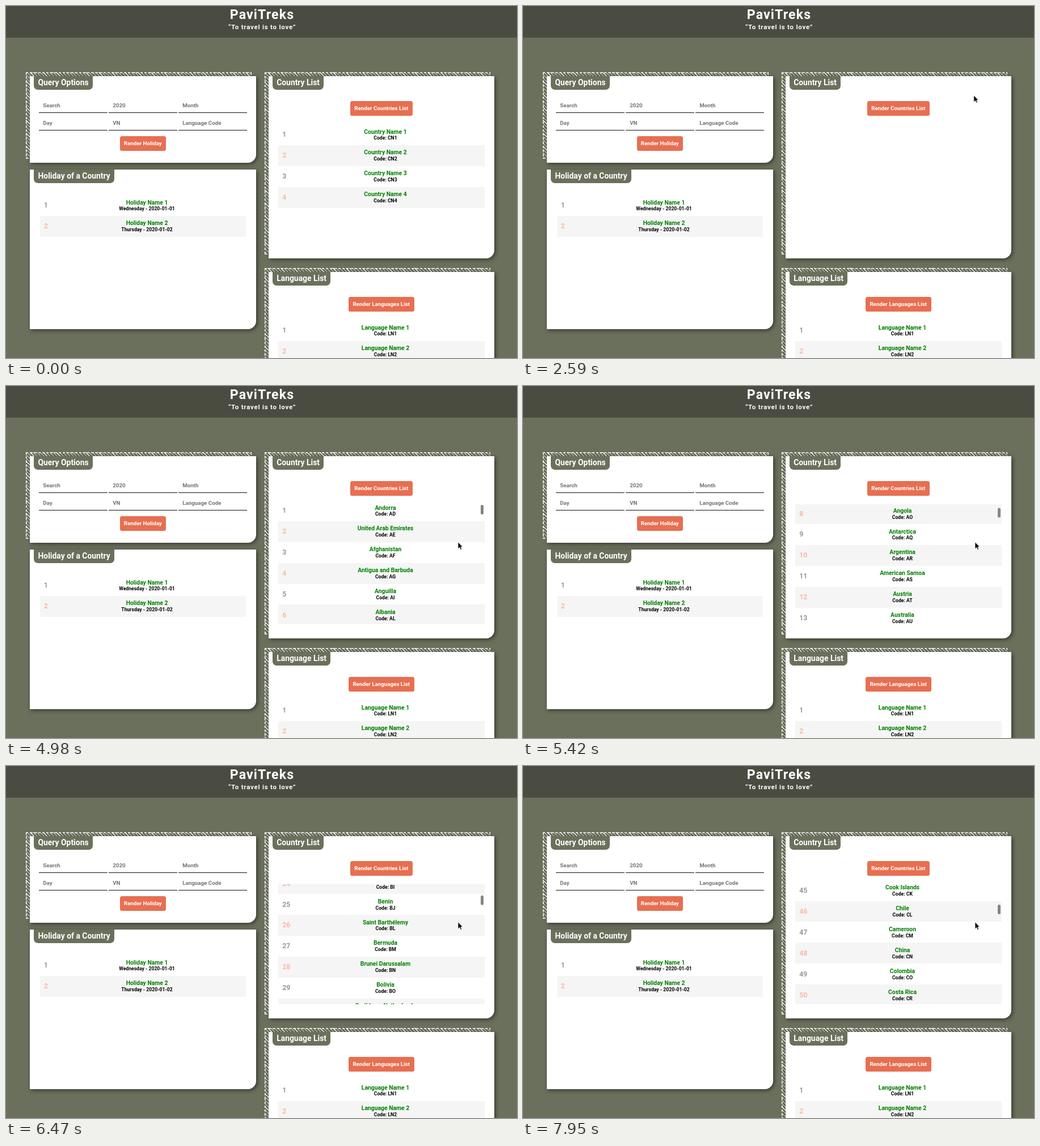
Recreate the animation shown at these times as an HTML page. Size 901 by 622 pixels, loop 8000 ms.

```html
<!DOCTYPE html>
<html lang="en">
<head>
<meta charset="utf-8">
<title>PaviTreks</title>
<style>
html, body { margin: 0; width: 100%; height: 100%; overflow: hidden; }
body { position: relative; background: #6b705c; font: 700 9.79px Roboto, Arial, sans-serif; color: #000; }
#stage { position: absolute; left: 0; top: 0; width: 901px; height: 622px; overflow: hidden; }
#stage div, #stage svg { position: absolute; box-sizing: border-box; white-space: nowrap; }

.head { left: 0; top: 0; width: 901px; height: 56px; background: #4b4c41; color: #fff; text-align: center; }
.head div { width: 100%; left: 1px; }
.name { top: 2px; font-size: 23.05px; line-height: 28px; letter-spacing: .05em; }
.motto { top: 29px; font-size: 11.52px; line-height: 16px; letter-spacing: .76px; }

.hatch {
  width: 398px;
  --dash: #fff 0 4.3px, transparent 4.3px 7.2px;
  background:
    repeating-linear-gradient(90deg, var(--dash)) 0 0 / 100% 1.5px no-repeat,
    repeating-linear-gradient(90deg, var(--dash)) 0 100% / 100% 1.5px no-repeat,
    repeating-linear-gradient(180deg, var(--dash)) 0 0 / 1.5px 100% no-repeat,
    repeating-linear-gradient(180deg, var(--dash)) 100% 0 / 1.5px 100% no-repeat,
    repeating-linear-gradient(45deg, transparent 0 3.2px, #f4f4ee 3.2px 4.07px);
}
.card { width: 398.5px; background: #fff; border-radius: 0 0 14.4px 0; box-shadow: 2.2px 2.2px 7.2px rgba(0, 0, 0, .5); }
.tab {
  left: 7.3px; top: 0; height: 24px; padding: 0 7.2px; border-radius: 0 0 7.2px 7.2px;
  background: #6b705c; color: #fff; font-size: 13.9px; line-height: 23px;
}
.field { width: 120.7px; height: 26px; padding-left: 7.2px; border-bottom: 1px solid #111; color: #757575; line-height: 26px; }
.btn { height: 26px; border-radius: 3.6px; background: #e76f51; color: #fff; line-height: 26px; text-align: center; }

.clip { width: 364px; height: 212px; overflow: hidden; }
.list { left: 0; top: 0; width: 100%; }
.row { left: 0; width: 363.5px; height: 36.88px; text-align: center; }
.row:nth-child(even) { background: #f5f5f5; }
.num { left: 7.2px; top: .4px; font-size: 12.4px; line-height: 36.8px; color: #999; }
.row:nth-child(even) .num { color: #f9baa6; }
.label { left: 0; width: 378px; top: 7.5px; font-size: 10.37px; line-height: 12px; color: green; }
.code { left: 0; width: 378px; top: 19.4px; font-size: 8.64px; line-height: 10px; }
.thumb { left: 837px; top: 210px; width: 5px; height: 17px; border-radius: 2.5px; background: #858585; }

#before, #after, #scroll, .thumb, .hover, .cursor, .arrow, .hand { animation: 8s step-end infinite; }
#before { animation-name: before; }
#after { animation-name: after; }
#scroll { animation-name: scroll; }
.thumb { animation-name: thumb; }
.hover { animation-name: hover; }
.cursor { left: 0; top: 0; animation-name: move; }
.arrow { animation-name: arrow; }
.hand { animation-name: hand; }
svg { overflow: visible; left: 0; top: 0; }

@keyframes before { 0% { visibility: visible } 26.75%, 100% { visibility: hidden } }
@keyframes after { 0% { visibility: hidden } 45.375%, 100% { visibility: visible } }
@keyframes arrow { 0% { visibility: visible } 19.25% { visibility: hidden } 28.625%, 100% { visibility: visible } }
@keyframes hand { 0% { visibility: hidden } 19.25% { visibility: visible } 28.625%, 100% { visibility: hidden } }
@keyframes hover {
  0% { background: #e76f51 }
  19.25% { background: #b46647 }
  21.125% { background: #825d3e }
  23% { background: #4f5434 }
  28.625% { background: #825d3e }
  30.5% { background: #b46647 }
  32.375%, 100% { background: #e76f51 }
}
@keyframes move {
  0% { transform: translate(960px, 130px) }
  6.25% { transform: translate(889px, 139.5px) }
  8.125% { transform: translate(818px, 146px) }
  10% { transform: translate(758px, 159px) }
  11.875% { transform: translate(715px, 171px) }
  13.75% { transform: translate(699.5px, 177.5px) }
  19.25% { transform: translate(697px, 179px) }
  28.625% { transform: translate(742px, 171px) }
  30.5% { transform: translate(782px, 161px) }
  32.375% { transform: translate(794.7px, 157.7px) }
  54.75% { transform: translate(825px, 150px) }
  56.625% { transform: translate(852px, 146px) }
  58.5% { transform: translate(835px, 190px) }
  60.375% { transform: translate(802px, 262px) }
  62.25%, 100% { transform: translate(797px, 275.7px) }
}
@keyframes scroll {
  0% { transform: translateY(0) }
  62.25% { transform: translateY(-7px) }
  64% { transform: translateY(-85px) }
  65.875% { transform: translateY(-185px) }
  67.75% { transform: translateY(-260px) }
  69.625% { transform: translateY(-305px) }
  71.5% { transform: translateY(-420px) }
  73.375% { transform: translateY(-553px) }
  75.25% { transform: translateY(-680px) }
  77.125% { transform: translateY(-775px) }
  79% { transform: translateY(-835px) }
  80.875% { transform: translateY(-868px) }
  82.625% { transform: translateY(-884px) }
  84.5% { transform: translateY(-890px) }
  88.25% { transform: translateY(-937px) }
  90.125% { transform: translateY(-1090px) }
  92% { transform: translateY(-1190px) }
  95.75% { transform: translateY(-1265px) }
  97.625% { transform: translateY(-1450px) }
  99.375%, 100% { transform: translateY(-1630px) }
}
@keyframes thumb {
  0% { visibility: hidden; transform: none }
  62.25% { visibility: visible; transform: none }
  64% { transform: translateY(2px) }
  65.875% { transform: translateY(4px) }
  67.75% { transform: translateY(5.5px) }
  69.625% { transform: translateY(6.5px) }
  71.5% { transform: translateY(9px) }
  73.375% { transform: translateY(12px) }
  75.25% { transform: translateY(14.5px) }
  77.125% { transform: translateY(16.5px) }
  79% { transform: translateY(18px) }
  80.875% { transform: translateY(18.7px) }
  82.625% { transform: translateY(19px) }
  88.25% { transform: translateY(20px) }
  90.125% { transform: translateY(23.5px) }
  92% { transform: translateY(25.5px) }
  95.75% { transform: translateY(27px) }
  97.625% { transform: translateY(31px) }
  99.375%, 100% { visibility: visible; transform: translateY(35px) }
}
</style>
</head>
<body>
<div id="stage">
  <div class="head">
    <div class="name">PaviTreks</div>
    <div class="motto">“To travel is to love”</div>
  </div>

  <div class="hatch" style="left:35px;top:117px;height:153px"></div>
  <div class="card" style="left:42px;top:124px;height:153px"><div class="tab">Query Options</div></div>
  <div id="fields"></div>
  <div class="btn" style="left:200.5px;top:229.5px;width:81.5px">Render Holiday</div>

  <div class="card" style="left:42px;top:289px;height:282px"><div class="tab">Holiday of a Country</div></div>
  <div class="clip" style="left:59.5px;top:334px"><div class="list" id="holidays"></div></div>

  <div class="hatch" style="left:456px;top:117px;height:322px"></div>
  <div class="card" style="left:462.7px;top:124px;height:322px"><div class="tab">Country List</div></div>
  <div class="btn hover" style="left:607px;top:168px;width:109.5px">Render Countries List</div>
  <div class="clip" style="left:480px;top:209px">
    <div class="list" id="before"></div>
    <div class="list" id="after"><div class="list" id="scroll"></div></div>
  </div>
  <div class="thumb"></div>

  <div class="hatch" style="left:456px;top:463px;height:322px"></div>
  <div class="card" style="left:462.7px;top:470px;height:322px"><div class="tab">Language List</div></div>
  <div class="btn" style="left:604px;top:514px;width:115.5px">Render Languages List</div>
  <div class="clip" style="left:480px;top:555px"><div class="list" id="languages"></div></div>

  <div class="cursor">
    <svg class="arrow" width="10" height="15"><path d="M0 0V12.2L2.8 9.6 4.6 13.6 6.6 12.7 4.9 8.8H8.4Z" fill="#000" stroke="#fff" stroke-width=".8"/></svg>
    <svg class="hand" width="12" height="15"><path d="M3 8V1.6a1.1 1.1 0 0 1 2.2 0V5.2a1 1 0 0 1 1.9.3a1 1 0 0 1 1.9.4a.9.9 0 0 1 1.6.7V9.5L9.6 11.5V13.2H4.6V11.8L1 8.2A1 1 0 0 1 2.5 7Z" fill="#fff" stroke="#000" stroke-width=".9" stroke-linejoin="round"/></svg>
  </div>
</div>

<script>
const PITCH = 36.88;
const countries = `AD Andorra,AE United Arab Emirates,AF Afghanistan,AG Antigua and Barbuda,AI Anguilla,AL Albania,
AM Armenia,AO Angola,AQ Antarctica,AR Argentina,AS American Samoa,AT Austria,AU Australia,AW Aruba,AX Åland Islands,
AZ Azerbaijan,BA Bosnia and Herzegovina,BB Barbados,BD Bangladesh,BE Belgium,BF Burkina Faso,BG Bulgaria,BH Bahrain,
BI Burundi,BJ Benin,BL Saint Barthélemy,BM Bermuda,BN Brunei Darussalam,BO Bolivia,BQ Caribbean Netherlands,BR Brazil,
BS Bahamas,BT Bhutan,BV Bouvet Island,BW Botswana,BY Belarus,BZ Belize,CA Canada,CC Cocos Islands,CD Congo,
CF Central African Republic,CG Congo,CH Switzerland,CI Ivory Coast,CK Cook Islands,CL Chile,CM Cameroon,CN China,
CO Colombia,CR Costa Rica,CU Cuba`.split(/,\s*/).map(s => [s.slice(3), 'Code: ' + s.slice(0, 2)]);

function fill(id, rows) {
  document.getElementById(id).innerHTML = rows.map(([label, code], i) =>
    `<div class="row" style="top:${(i * PITCH).toFixed(2)}px"><div class="num">${i + 1}</div>` +
    `<div class="label">${label}</div><div class="code">${code}</div></div>`).join('');
}
const numbered = (count, label, code) =>
  Array.from({ length: count }, (_, i) => [`${label} ${i + 1}`, `Code: ${code}${i + 1}`]);

fill('holidays', [['Holiday Name 1', 'Wednesday - 2020-01-01'], ['Holiday Name 2', 'Thursday - 2020-01-02']]);
fill('before', numbered(4, 'Country Name', 'CN'));
fill('scroll', countries);
fill('languages', numbered(2, 'Language Name', 'LN'));

document.getElementById('fields').innerHTML = ['Search', '2020', 'Month', 'Day', 'VN', 'Language Code'].map((text, i) =>
  `<div class="field" style="left:${58 + i % 3 * 123}px;top:${i < 3 ? 163.4 : 194}px">${text}</div>`).join('');
</script>
</body>
</html>
```
